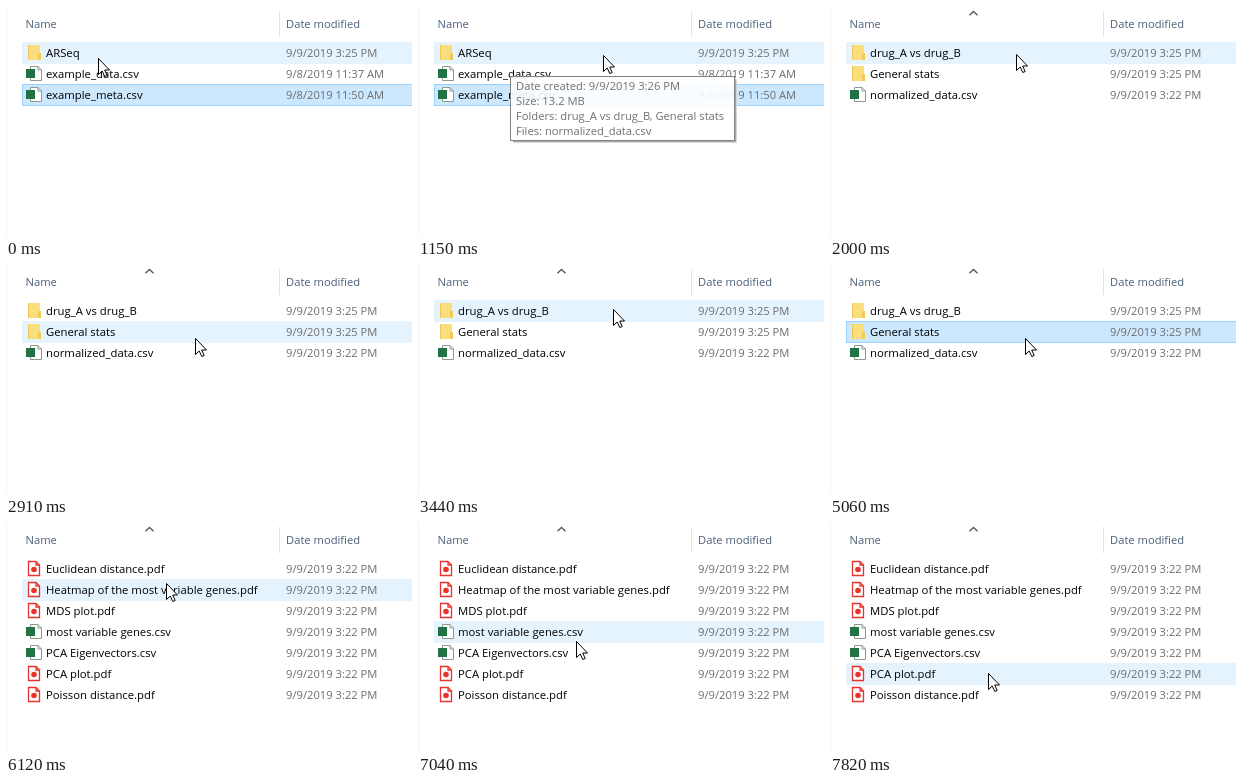
Animation, 406 px wide and 230 px high, one loop 8000 ms. Source, as an HTML page with a canvas:

```html
<!DOCTYPE html>
<html lang="en">
<head>
<meta charset="utf-8">
<title>File browser</title>
<style>
  html, body { margin: 0; width: 100%; height: 100%; overflow: hidden; background: #fff; }
  canvas { display: block; width: 406px; height: 230px; }
</style>
</head>
<body>
<canvas id="stage"></canvas>
<script>
const W = 406, H = 230, LOOP = 8000;
const LEFT = 16, ROW_TOP = 36, ROW_STEP = 21;
const FONT = '"Open Sans", "Noto Sans", sans-serif';

// Moments of the story, in ms.
const TIP_SHOWN = 1150, TIP_SOLID = 1310, FIRST_CLICK = 1740, FIRST_OPEN = 1880;
const FIRST_HOVER = 2000, SECOND_CLICK = 5060, SECOND_OPEN = 5310;

const canvas = document.getElementById('stage');
const ctx = canvas.getContext('2d');
const ratio = window.devicePixelRatio || 1;
canvas.width = W * ratio;
canvas.height = H * ratio;
ctx.scale(ratio, ratio);

const results = [
  ['ARSeq', '9/9/2019 3:25 PM'],
  ['example_data.csv', '9/8/2019 11:37 AM'],
  ['example_meta.csv', '9/8/2019 11:50 AM']
];
const analysis = [
  ['drug_A vs drug_B', '9/9/2019 3:25 PM'],
  ['General stats', '9/9/2019 3:25 PM'],
  ['normalized_data.csv', '9/9/2019 3:22 PM']
];
const stats = [
  'Euclidean distance.pdf', 'Heatmap of the most variable genes.pdf', 'MDS plot.pdf',
  'most variable genes.csv', 'PCA Eigenvectors.csv', 'PCA plot.pdf', 'Poisson distance.pdf'
].map(name => [name, '9/9/2019 3:22 PM']);

// Pointer strokes: when the first and last step happen, and where the stroke ends.
const HOME = { x: 92, y: 52 };
const strokes = [
  { from: TIP_SHOWN, x: 185, y: 49 },
  { from: TIP_SOLID, x: 186, y: 48 },
  { from: 2910, to: 3170, x: 192, y: 94 },
  { from: 3290, x: 194, y: 48 },
  { from: 3440, x: 195, y: 45 },
  { from: 3750, to: 4010, x: 195, y: 84 },
  { from: 4610, x: 195, y: 74 },
  { from: 5470, x: 189, y: 72 },
  { from: 5610, to: 5730, x: 165, y: 50 },
  { from: 5880, to: 6120, x: 160, y: 61 },
  { from: 6270, to: 6580, x: 158, y: 98 },
  { from: 6730, x: 158, y: 105 },
  { from: 7040, to: 7160, x: 158, y: 123 },
  { from: 7430, to: 7820, x: 158, y: 151 }
];

// The pointer advances in hard steps of about 140 ms along an ease-out.
function pointerAt(t) {
  let pos = HOME;
  for (const { from, to = from, x, y } of strokes) {
    if (t < from) break;
    const gaps = Math.round((to - from) / 140);
    const done = gaps ? Math.min(gaps, Math.floor((t - from) / (to - from) * gaps)) : 0;
    const eased = 1 - (1 - (done + 1) / (gaps + 1)) ** 2;
    const mix = (a, b) => Math.round(a + (b - a) * eased);
    pos = { x: mix(pos.x, x), y: mix(pos.y, y) };
    if (done < gaps) break;
  }
  return pos;
}

function selectedAt(t) {
  if (t < FIRST_CLICK) return 2;
  if (t < FIRST_OPEN) return 0;
  return t >= SECOND_CLICK && t < SECOND_OPEN ? 1 : -1;
}

function rect(x, y, w, h, color) {
  ctx.fillStyle = color;
  ctx.fillRect(x, y, w, h);
}

function text(str, x, y, color, size = 11.2) {
  ctx.font = `${size}px ${FONT}`;
  ctx.fillStyle = color;
  ctx.fillText(str, x, y);
}

function shape(points, fill, stroke, width = 1, closed = true) {
  ctx.beginPath();
  points.forEach(([x, y]) => ctx.lineTo(x, y));
  if (closed) ctx.closePath();
  if (fill) { ctx.fillStyle = fill; ctx.fill(); }
  if (stroke) { ctx.strokeStyle = stroke; ctx.lineWidth = width; ctx.stroke(); }
}

function page(x, y, w, h, color, width) {
  const fold = 3.5, right = x + w;
  shape([[x, y], [right - fold, y], [right, y + fold], [right, y + h], [x, y + h]], '#fff', color, width);
  shape([[right - fold, y], [right - fold, y + fold], [right, y + fold]], null, color, width, false);
}

const icons = {
  folder(y) {
    rect(22, y + 3, 12, 15, '#fbde7c');
    rect(22, y + 3, 1, 15, '#efc65a');
    rect(32, y + 11, 3, 7, '#f3ca58');
  },
  csv(y) {
    page(24.5, y + 3.5, 11, 14, '#8c9a91');
    rect(20, y + 6, 9, 9, '#217346');
  },
  pdf(y) {
    page(22.5, y + 3.5, 11, 14, '#e8332c', 1.3);
    ctx.beginPath();
    ctx.arc(28, y + 11.5, 2.8, 0, Math.PI * 2);
    ctx.fillStyle = '#e8332c';
    ctx.fill();
  }
};

function drawHeader(sorted) {
  rect(0, 0, 1, H, '#f3f3f3');
  text('Name', 19.5, 22, '#4c607a');
  text('Date modified', 280, 22, '#4c607a');
  rect(273, 5, 1, 26, '#e3e3e3');
  if (sorted) shape([[139.5, 9.2], [143.5, 5.5], [147.5, 9.2]], null, '#555', 1.3, false);
}

function drawRows(rows, hover, selected) {
  const top = i => ROW_TOP + ROW_STEP * i;
  if (hover >= 0) rect(LEFT, top(hover), W - LEFT, 22, '#e5f3ff');
  if (selected >= 0) {
    rect(LEFT, top(selected), W - LEFT, 22, '#99d1ff');
    rect(LEFT + 1, top(selected) + 1, W, 20, '#cce8ff');
  }
  rows.forEach(([name, date], i) => {
    const kind = name.includes('.') ? name.split('.').pop() : 'folder';
    icons[kind](top(i));
    text(name, 40, top(i) + 15, '#000', 11.3);
    text(date, 280, top(i) + 15, '#6d6d6d');
  });
}

function drawTooltip(alpha) {
  const x = 92, y = 70, w = 225, h = 65;
  ctx.save();
  ctx.globalAlpha = alpha;
  for (const [depth, shade] of [[0, '#a0a0a0'], [1, '#d4d4d4']]) {
    rect(x + w + depth, y + 3, 1, h - 2 + depth, shade);
    rect(x + 3, y + h + depth, w - 3 + depth, 1, shade);
  }
  rect(x, y, w, h, '#fff');
  ctx.strokeStyle = '#767676';
  ctx.lineWidth = 1;
  ctx.strokeRect(x + 0.5, y + 0.5, w - 1, h - 1);
  [
    'Date created: 9/9/2019 3:26 PM',
    'Size: 13.2 MB',
    'Folders: drug_A vs drug_B, General stats',
    'Files: normalized_data.csv'
  ].forEach((line, i) => text(line, x + 6, y + 14 + 15 * i, '#606060'));
  ctx.restore();
}

function drawPointer({ x, y }) {
  ctx.save();
  ctx.translate(x + 0.5, y + 0.5);
  shape([[0, 0], [0, 16], [3.7, 12.5], [6.3, 18], [8.7, 17], [6.2, 11.5], [11, 11.5]], '#fff', '#000');
  ctx.restore();
}

function draw(now) {
  const t = now % LOOP;
  const rows = t < FIRST_OPEN ? results : t < SECOND_OPEN ? analysis : stats;
  const pointer = pointerAt(t);
  const loading = t >= FIRST_OPEN && t < FIRST_HOVER;
  const hover = loading ? -1 : Math.floor((pointer.y - ROW_TOP) / ROW_STEP);

  rect(0, 0, W, H, '#fff');
  drawHeader(rows !== results);
  drawRows(rows, hover, selectedAt(t));
  if (t >= TIP_SHOWN && t < FIRST_CLICK) drawTooltip(t < TIP_SOLID ? 0.9 : 1);
  drawPointer(pointer);
  requestAnimationFrame(draw);
}
requestAnimationFrame(draw);
</script>
</body>
</html>
```
